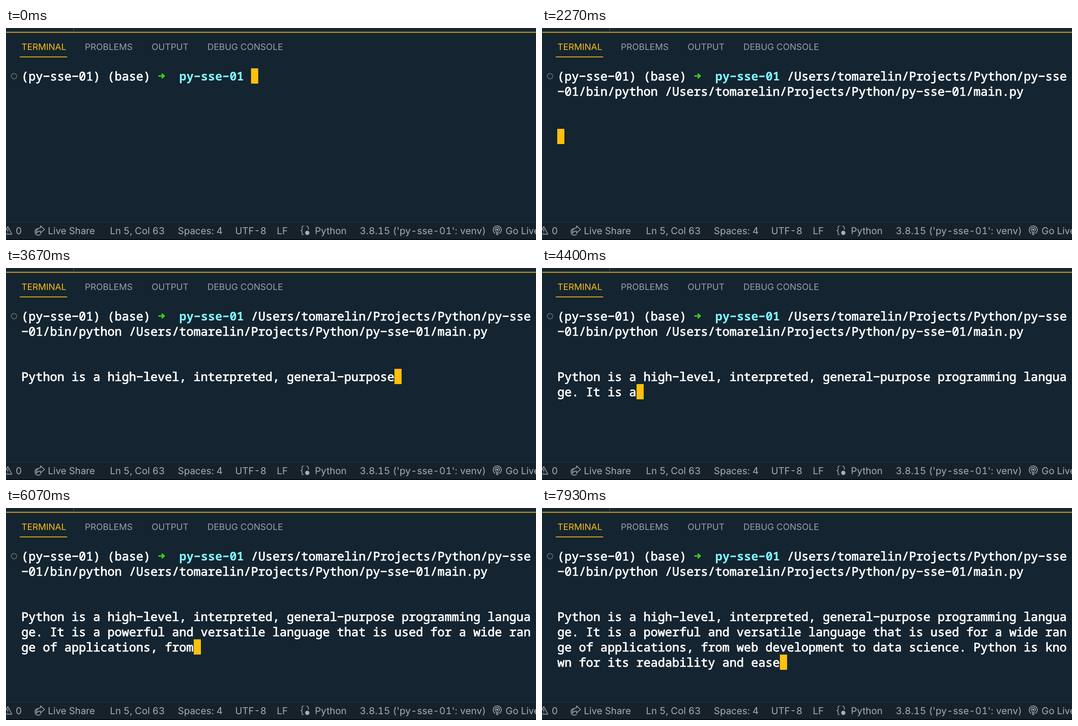
These frames come from a looping animation (1183 px wide and 473 px high, 8 s). An HTML page:

```html
<!DOCTYPE html>
<html lang="en">
<head>
<meta charset="utf-8">
<title>Terminal stream</title>
<style>
  html, body { margin: 0; width: 100%; height: 100%; overflow: hidden; background: #142430; }
  svg { display: block; width: 1183px; height: 473px; }
  text { white-space: pre; text-rendering: geometricPrecision; }
  .term { font: 500 26.7px "Noto Sans Mono", "DejaVu Sans Mono", monospace; font-variant-ligatures: none; fill: #fff; stroke: #fff; stroke-width: .9; }
  .dir { font-weight: 700; fill: #80fcff; stroke: none; }
  .tabs { font: 400 19.7px Inter, Roboto, sans-serif; fill: #98a1a6; }
  .tabs .on { fill: #f8bd16; }
  .status { font: 400 21.3px Inter, Roboto, sans-serif; font-variant-numeric: tabular-nums; fill: #a6adb1; }
  .status .version { letter-spacing: .01em; }
  .icon { fill: none; stroke: #a6adb1; stroke-width: 1.6; stroke-linejoin: round; stroke-linecap: round; }
</style>
</head>
<body>
<svg viewBox="0 0 1183 473">
  <rect width="1183" height="473" fill="#142430"/>
  <rect width="1183" height="8.6" fill="#162733"/>
  <path d="M151 0V8" stroke="#2b414f" stroke-width="2"/>
  <rect y="8.6" width="1183" height="2" fill="#dda818"/>

  <g class="tabs">
    <text class="on" x="34.5" y="48.5">TERMINAL</text>
    <text x="176" y="48.5">PROBLEMS</text>
    <text x="325" y="48.5">OUTPUT</text>
    <text x="449.5" y="48.5">DEBUG CONSOLE</text>
  </g>
  <rect x="30.5" y="63.5" width="106" height="2" fill="#e5ae17"/>

  <circle cx="18" cy="107.5" r="6" fill="none" stroke="#56646e" stroke-width="2"/>
  <g class="term" id="screen">
    <text x="34.3" y="117">(py−sse−01) (base)</text>
    <text class="dir" x="386.8" y="117">py−sse−01</text>
  </g>
  <path d="M340 107H351M347.5 102L353 107L347.5 112" fill="none" stroke="#3ad11c" stroke-width="3.2"/>
  <rect id="cursor" width="16" height="34" fill="#ffc00b"/>

  <rect y="432" width="1183" height="41" fill="#15222b"/>
  <rect y="432" width="1183" height="1.5" fill="#17364f"/>
  <rect y="471" width="1183" height="2" fill="#060b0f"/>
  <g class="status">
    <text x="21.5" y="459.5">0</text>
    <text x="93.5" y="459.5">Live Share</text>
    <text x="232" y="459.5">Ln 5, Col 63</text>
    <text x="383.5" y="459.5">Spaces: 4</text>
    <text x="511.5" y="459.5">UTF-8</text>
    <text x="604.5" y="459.5">LF</text>
    <text x="689.5" y="459.5">Python</text>
    <text class="version" x="789.5" y="459.5">3.8.15 ('py-sse-01': venv)</text>
    <text x="1115" y="459.5">Go Live</text>
  </g>
  <g class="icon">
    <path d="M-5 460L4 443L13 460ZM4 449V454M4 457V457.5"/>
    <path d="M77 441.5L86 449.5L77 457.5V453C72 453 69.5 455 68 458C67.5 450 71 446 77 446Z"/>
    <path d="M69.5 447.5A8 8 0 0 0 71 462.5A8 8 0 0 0 77.5 460"/>
    <path d="M664 442C659 442 661 447 661 449C661 451 659 452 658 452C659 452 661 453 661 455C661 457 659 461 664 461M671 442C676 442 674 446 675 449"/>
    <circle cx="672.5" cy="457" r="4" fill="#a6adb1"/>
    <path d="M1091.5 458A9 9 0 1 1 1101.5 458M1093 453.5A5 5 0 1 1 1100 453.5"/>
    <path d="M1095 455H1098V461H1095Z"/>
    <circle cx="1096.5" cy="450" r="1.6" fill="#a6adb1"/>
  </g>
</svg>
<script>
const LOOP = 8000, COLS = 71, CELL = 16.02, LEFT = 34.3, TOP = 90, ROW = 33.8;
const RUN_AT = 800, READY_AT = 2270, PROMPT_COLS = 32, ANSWER_ROW = 4;
const home = "/Users/tomarelin/Projects/Python/py-sse";
const command = home + "-01/bin/python " + home + "-01/main.py";

// Streamed pieces of the answer with their arrival times.
const tokens = [
  [2470, "Python"], [2530, " is"], [2600, " a"], [2730, " high"], [2800, "-"], [2870, "level"], [3000, ","],
  [3270, " interpreted"], [3330, ","],
  [3470, " general"], [3600, "-"], [3670, "purpose"], [3730, " programming"], [3800, " language"], [3930, "."],
  [4200, " It"], [4330, " is"], [4400, " a"], [4470, " powerful"],
  [4670, " and"], [4730, " vers"], [4800, "atile"], [4870, " language"], [4930, " that"], [5000, " is"], [5130, " used"],
  [5270, " for a"], [5400, " wide"], [5470, " range"], [5530, " of"], [5670, " applications"],
  [5930, ","], [6000, " from"], [6130, " web"], [6200, " development"], [6330, " to"], [6400, " data"], [6530, " science"], [6730, "."],
  [7070, " Python"], [7130, " is"], [7270, " known"], [7330, " for"], [7400, " its"], [7530, " read"], [7600, "ability"], [7730, " and"], [7870, " ease"]
];

const screen = document.getElementById("screen");
const cursor = document.getElementById("cursor");

function addLine(row, col = 0) {
  const line = document.createElementNS("http://www.w3.org/2000/svg", "text");
  line.setAttribute("x", LEFT + col * CELL);
  line.setAttribute("y", 117 + row * ROW);
  screen.append(line);
  return line;
}

const commandLines = [addLine(0, PROMPT_COLS), addLine(1)];
const answerLines = [0, 1, 2, 3].map(i => addLine(ANSWER_ROW + i));

// The terminal shows hyphens as wide dashes.
function setLine(line, text) {
  line.textContent = text.replaceAll("-", "−");
}

function moveCursor(row, col) {
  cursor.setAttribute("x", Math.round(LEFT + col * CELL));
  cursor.setAttribute("y", Math.round(TOP + row * ROW));
}

function render(time) {
  const typed = time < RUN_AT ? "" : command;
  const firstRow = COLS - PROMPT_COLS;
  setLine(commandLines[0], typed.slice(0, firstRow));
  setLine(commandLines[1], typed.slice(firstRow));

  const answer = tokens.filter(([at]) => at <= time).map(([, piece]) => piece).join("");
  answerLines.forEach((line, i) => setLine(line, answer.slice(i * COLS, (i + 1) * COLS)));

  if (time < RUN_AT) moveCursor(0, PROMPT_COLS);
  else if (time < READY_AT) moveCursor(2, 0);
  else moveCursor(ANSWER_ROW + Math.floor(answer.length / COLS), answer.length % COLS);
}

function tick() {
  render(performance.now() % LOOP);
  requestAnimationFrame(tick);
}
tick();
</script>
</body>
</html>
```
